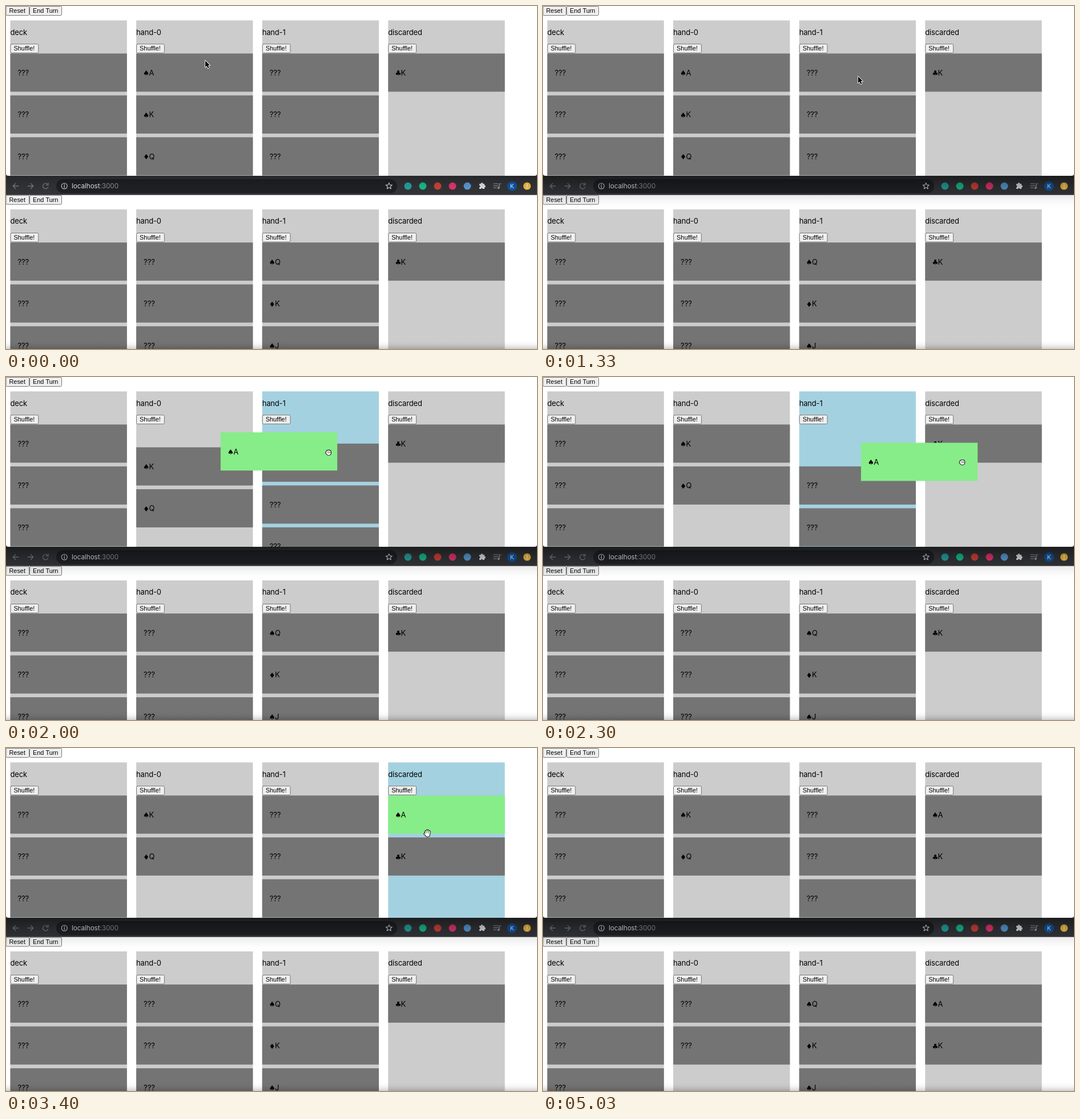
Recreate the animation shown at these times as an HTML page with a canvas. Size 930 by 602 pixels, loop 5.63 s.

```html
<!DOCTYPE html>
<html lang="en">
<head>
<meta charset="utf-8">
<title>Card table</title>
<style>
html, body { margin: 0; width: 100%; height: 100%; overflow: hidden; background: #fff; }
canvas { display: block; width: 930px; height: 602px; }
</style>
</head>
<body>
<canvas id="stage" width="930" height="602"></canvas>
<script>
const ctx = document.getElementById('stage').getContext('2d');
const LOOP = 5630;
const UI = 'Inter, "Open Sans", sans-serif';
const BTN = '"Liberation Sans", Arial, sans-serif';
const SUIT = '"DejaVu Sans", sans-serif';
const GREY = '#ccc', CARD = '#747474', BLUE = '#a4d1e0', GREEN = '#87ed88';

const NAMES = ['deck', 'hand-0', 'hand-1', 'discarded'];
const COL_W = 204.3, CARD_H = 67, STEP = 73.5, TOP = 83.4, BAR = 298, LOWER = 331.7;
const colX = i => 7.5 + i * 220.6;

// Moments of the drag, in ms
const LIFT = 1765, OVER_HAND = 1970, OVER_PILE = 2325, DROP = 2890, LANDED = 3425, SYNC = 3465;
const SLIDE = 220, LAG = 38, GRAB = { x: 390.5, y: 115.8 };

const clamp = v => Math.min(1, Math.max(0, v));
const mix = (a, b, k) => a + (b - a) * k;
const out = p => s => 1 - (1 - s) ** p;
const smooth = s => s * s * (3 - 2 * s);
const slide = (t, start) => out(4)(clamp((t - start) / SLIDE));

const REST = { x: 348.5, y: 95 };
const MOVES = [
  { start: 450, time: 580, x: 573.5, y: 124, ease: out(3) },
  { start: 1250, time: 380, x: 384, y: 114, ease: smooth },
  { start: 1758, time: 558, x: 738, y: 149.7, ease: out(1.25) },
  { start: 4545, time: 265, x: 779, y: -40, ease: smooth }
];
function pointer(t) {
  let { x, y } = REST;
  for (const m of MOVES) {
    const k = m.ease(clamp((t - m.start) / m.time));
    x = mix(x, m.x, k);
    y = mix(y, m.y, k);
  }
  return { x, y };
}

function rect(x, y, w, h, fill) {
  ctx.fillStyle = fill;
  ctx.fillRect(x, y, w, h);
}
function round(x, y, w, h, r, fill, edge) {
  ctx.beginPath();
  ctx.roundRect(x, y, w, h, r);
  ctx.fillStyle = fill;
  ctx.fill();
  if (!edge) return;
  ctx.strokeStyle = edge;
  ctx.lineWidth = 1;
  ctx.stroke();
}
function dot(x, y, r, fill) {
  ctx.fillStyle = fill;
  ctx.beginPath();
  ctx.arc(x, y, r, 0, 7);
  ctx.fill();
}
function ring(x, y, r, from, to, color, width = 1.1) {
  ctx.strokeStyle = color;
  ctx.lineWidth = width;
  ctx.beginPath();
  ctx.arc(x, y, r, from, to);
  ctx.stroke();
}
function line(width, color, ...runs) {
  ctx.lineWidth = width;
  ctx.strokeStyle = color;
  ctx.beginPath();
  for (const r of runs)
    for (let i = 0; i < r.length; i += 2) ctx[i ? 'lineTo' : 'moveTo'](r[i], r[i + 1]);
  ctx.stroke();
}
function text(s, x, y, size, font, fill = '#000', track = 0) {
  ctx.font = size + 'px ' + font;
  ctx.letterSpacing = track + 'px';
  ctx.fillStyle = fill;
  ctx.fillText(s, x, y);
}
function button(label, x, y, w, h) {
  round(x + .5, y + .5, w - 1, h - 1, 2, '#efefef', '#767676');
  text(label, x + 6, y + h / 2 + 3.8, 10.9, BTN);
}

function card(label, x, y, fill = CARD) {
  rect(x, y, COL_W, CARD_H, fill);
  const base = y + 38.4;
  if (label === '???') return text(label, x + 13, base, 13, UI, '#000', -.1);
  ctx.textAlign = 'center';
  text(label[0], x + 17.5, base + .6, 12.5, SUIT);
  ctx.textAlign = 'left';
  text(label[1], x + 22.3, base, 13, UI);
}
// Each card is [label, row]
function column(i, cards, lit) {
  const x = colX(i);
  rect(x, 25.3, COL_W, 400, lit ? BLUE : GREY);
  text(NAMES[i], x, 50.7, 13, UI, '#000', -.18);
  button('Shuffle!', x, 66.3, 49.8, 16.6);
  for (const [label, row] of cards) card(label, x, TOP + row * STEP);
}
function topButtons() {
  button('Reset', -.5, 0, 41.5, 17);
  button('End Turn', 41, 0, 57, 17);
}
const stack = (...labels) => labels.map((s, i) => [s, i]);
const HIDDEN = ['???', '???', '???'];

function lowerPage(t) {
  const synced = t >= SYNC;
  ctx.save();
  ctx.translate(0, LOWER);
  topButtons();
  column(0, stack(...HIDDEN));
  column(1, stack(...HIDDEN.slice(synced ? 1 : 0)));
  column(2, stack('♠Q', '♦K', '♠J'));
  column(3, synced ? stack('♠A', '♣K') : stack('♣K'));
  ctx.restore();
}

// The lifted card trails the pointer, then settles on the pile
function aceAt(t) {
  if (t < LIFT) return [colX(1), TOP];
  const p = pointer(Math.min(t, DROP) - LAG);
  const k = out(5)(clamp((t - DROP) / (LANDED - DROP)));
  return [
    mix(colX(1) + Math.max(0, p.x - GRAB.x), colX(3), k),
    mix(TOP + Math.max(0, p.y - GRAB.y), TOP, k)
  ];
}

function upperPage(t) {
  const lifted = t >= LIFT && t < LANDED;
  const gone = slide(t, OVER_HAND), pile = slide(t, OVER_PILE);
  const over = !lifted ? 0 : t < OVER_HAND ? 1 : t < OVER_PILE ? 2 : 3;
  ctx.save();
  ctx.beginPath();
  ctx.roundRect(0, -10, 930, BAR + 10, 4);
  ctx.clip();
  rect(0, 0, 930, BAR, '#fff');
  topButtons();
  column(0, stack(...HIDDEN));
  column(1, [['♠K', 1 - gone], ['♦Q', 2 - gone]], over === 1);
  column(2, HIDDEN.map((s, i) => [s, i + gone - pile]), over === 2);
  column(3, [['♣K', pile]], over === 3);
  card('♠A', ...aceAt(t), lifted ? GREEN : CARD);
  ctx.restore();
}

function navArrow(x, dir, color) {
  const tip = x + 4.8 * dir, head = x + .3 * dir;
  line(1.3, color, [x - 4.7 * dir, 316, tip, 316], [head, 311.5, tip, 316, head, 320.5]);
}
function star(x, y, r) {
  ctx.beginPath();
  for (let i = 0; i < 10; i++) {
    const a = i * Math.PI / 5 - Math.PI / 2, q = i % 2 ? r * .45 : r;
    ctx.lineTo(x + q * Math.cos(a), y + q * Math.sin(a));
  }
  ctx.closePath();
  ctx.strokeStyle = '#d5d7da';
  ctx.lineWidth = 1.1;
  ctx.stroke();
}
function puzzle(x, y, fill, back) {
  rect(x - 5, y - 4, 9, 9, fill);
  dot(x - .5, y - 4, 1.9, fill);
  dot(x + 4, y + .5, 1.9, fill);
  dot(x - 5, y + .5, 1.5, back);
  dot(x - .5, y + 5, 1.5, back);
}
function playlist(x, y, color) {
  for (let i = 0; i < 3; i++)
    line(1.2, color, [x - 6, y - 4 + i * 3.5, x + (i < 2 ? 2 : -1), y - 4 + i * 3.5]);
  line(1.2, color, [x + 4, y + 3, x + 4, y - 4, x + 7, y - 4]);
  dot(x + 2.6, y + 3.2, 1.8, color);
}
function toolbar() {
  const back = '#333438', dim = '#797c81', pale = '#d9dbde', y = 316;
  rect(0, 292, 930, LOWER - 292, back);
  round(88, 304, 597, 24.5, 12.2, '#202125');
  navArrow(17, -1, dim);
  navArrow(43, 1, dim);
  ring(69.3, y, 4.7, .4, 5.5, dim, 1.3);
  line(1.3, dim, [74, 310.5, 74, 314.2, 70.3, 314.2]);
  ring(102.2, y, 5, 0, 7, pale);
  line(1.2, pale, [102.2, 315.3, 102.2, 318.8], [102.2, 312.9, 102.2, 314]);
  text('localhost', 115, 320.2, 11.8, UI, '#e4e6e9', -.1);
  text(':3000', 115 + ctx.measureText('localhost').width, 320.2, 11.8, UI, '#92969b', -.1);
  star(670.8, y, 5.8);
  ['#27a3a0', '#18bd91', '#cf4337', '#e6366e', '#5a9bd5']
    .forEach((c, i) => dot(704 + i * 26, y, 6.5, c));
  puzzle(834, y, '#e0e2e5', back);
  playlist(860, y, '#9b9ea3');
  dot(886.3, y, 8.6, '#0f54a3');
  text('K', 882.7, 319.8, 10.5, UI, '#eef3fa');
  dot(912.6, y, 6.6, '#f2bd42');
  line(1.4, '#fff3d4', [912.6, 312.4, 912.6, 316.8], [912.6, 319, 912.6, 319.6]);
}

// A black fade; power sets how quickly it falls off from the edge
function shade(edge, reach, alpha, power) {
  const g = ctx.createLinearGradient(0, edge, 0, edge + reach);
  for (let i = 0; i <= 8; i++) g.addColorStop(i / 8, `rgba(0,0,0,${alpha * (1 - i / 8) ** power})`);
  rect(0, Math.min(edge, edge + reach), 930, Math.abs(reach), g);
}
// The shadow of the upper window deepens as it takes focus
function windowShadow(t) {
  const k = clamp((t - 20) / 310);
  shade(BAR - 5, mix(45, 64, k), mix(.32, .55, k), 2);
}

function arrow(x, y) {
  ctx.save();
  ctx.translate(x + .6, y + .9);
  ctx.beginPath();
  for (const p of [[0, 0], [0, 11.4], [2.6, 9], [4.6, 13.4], [6.5, 12.6], [4.6, 8.3], [8, 8.3]])
    ctx.lineTo(...p);
  ctx.closePath();
  ctx.strokeStyle = '#fff';
  ctx.lineWidth = 1.7;
  ctx.stroke();
  ctx.fillStyle = '#000';
  ctx.fill();
  ctx.restore();
}
function hand(x, y, closed) {
  const size = closed ? .6 : 1, low = closed ? 1.8 : 2.9;
  const fingers = [-1.5, -.5, .5, 1.5].map(i =>
    [i * 2 + .4, 1.5, i * (closed ? 2 : 2.5) + .3, size * (i * i * .8 - 5)]);
  fingers.push([-1, low + 1, -5 * Math.sqrt(size), .9]);
  ctx.save();
  ctx.translate(x, y);
  for (const [color, grow] of [['#000', .9], ['#fff', 0]]) {
    line(1.8 + grow * 2, color, ...fingers);
    ctx.fillStyle = color;
    ctx.beginPath();
    ctx.ellipse(.4, low, 3.5 + grow, 2.9 + grow, 0, 0, 7);
    ctx.fill();
  }
  if (closed) for (const k of [-1, 1, 3]) line(.7, '#000', [k, -.5, k, 1.2]);
  ctx.restore();
}
function cursor(t) {
  const { x, y } = pointer(t);
  const gripping = t > 1880 && t < DROP;
  const hovering = t >= DROP ? y > TOP : t > 1250 && t < 1790 && x < colX(1) + COL_W;
  if (gripping || hovering) hand(x, y, gripping);
  else arrow(x, y);
}

function draw(t) {
  ctx.lineCap = ctx.lineJoin = 'round';
  rect(0, 0, 930, 602, '#fff');
  lowerPage(t);
  toolbar();
  windowShadow(t);
  upperPage(t);
  shade(602, -20, .2, 3);
  cursor(t);
}

const begin = performance.now();
function frame() {
  draw((performance.now() - begin) % LOOP);
  requestAnimationFrame(frame);
}
frame();
</script>
</body>
</html>
```
